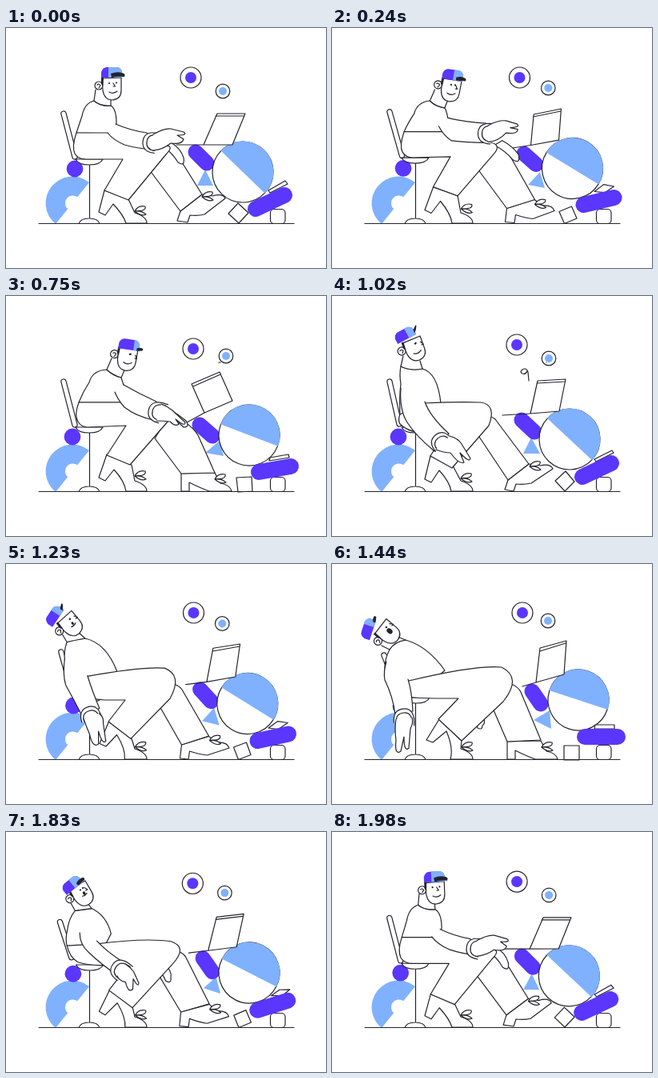
An HTML page that plays this animation: 400 px wide and 300 px high, repeating every 2.01 s.

```html
<!DOCTYPE html>
<html lang="en">
<head>
<meta charset="utf-8">
<title>Rocking at the desk</title>
<style>
html, body { margin: 0; width: 100%; height: 100%; overflow: hidden; background: #fff; }
svg { display: block; width: 100vw; height: 100vh; }
.line { fill: #fff; stroke: #24242f; stroke-width: 1.2; stroke-linejoin: round; stroke-linecap: round; }
.open { fill: none; }
.dark { fill: #24242f; }
.violet { fill: #5a36fe; }
.sky { fill: #80b1ff; }
.bar { fill: none; stroke: #5a36fe; stroke-linecap: round; }
</style>
</head>
<body>
<svg viewBox="0 0 400 300">
  <path class="sky" d="M104 193A33.400 33.400 0 0 0 62 245Z"/>
  <path fill="#fff" d="M89.500 211.500A9 9 0 1 0 77.500 226.500Z"/>
  <circle class="violet" id="dot" r="10.4"/>

  <path id="backEdge" fill="none" stroke="#24242f" stroke-width="7.4" stroke-linecap="round"/>
  <path id="backFill" fill="none" stroke="#fff" stroke-width="5" stroke-linecap="round"/>
  <path class="line" d="M104.500 168V238M91 244.500Q93 238 104 238Q115 238 117 244.500Z"/>
  <path class="line" id="seat" d="M87 164H121Q118 171 104 171Q90 171 87 164Z"/>

  <path class="sky" id="wedge"/>
  <path class="bar" id="pill" stroke-width="19"/>
  <g id="ball">
    <circle class="line" r="38"/>
    <path class="sky" d="M-38.500 0A38.500 38.500 0 0 1 38.500 0Z"/>
  </g>
  <path class="line" id="box"/>
  <rect class="line" x="330.500" y="226.500" width="18.500" height="18" rx="4.500"/>
  <path class="line" id="plate"/>
  <path class="bar" id="plank" stroke-width="20"/>

  <g id="coinA"><circle class="line" r="13"/><circle class="violet" r="7"/></g>
  <g id="coinB"><circle class="line" r="8.800"/><circle class="sky" r="5"/></g>
  <path class="line open" id="curl" pathLength="100" d="M268 83Q254 84 245 91Q243 99 238 97Q234 95 238 92Q243 89 245 95L246 106"/>
  <path class="line" id="laptop"/>

  <path class="line" id="bootB"/>
  <path class="line" id="legB"/>
  <path class="line laces" id="laceB"/>
  <path class="line" id="farHand"/>
  <path class="line" id="torso"/>
  <path class="line" id="neck"/>
  <g id="face">
    <circle class="line" cx="-14" cy="-2" r="5"/>
    <path class="line open" d="M-16 -3Q-14 -5 -12 -2L-14 1"/>
    <path class="line" d="M-10 -11L-9 4Q-7 16 3 16Q14 15 14 4V-12Z"/>
    <path class="dark" d="M-11 -12H-8L-8.500 -1L-11 -4Z"/>
    <circle class="dark" id="eyeL" cy="-5" r="1.100"/>
    <circle class="dark" id="eyeR" cy="-5.500" r="1.100"/>
    <path class="line" id="nose" d="M4 -5L6.500 -1H4"/>
    <path class="line open" id="smile"/>
    <ellipse class="dark" id="gasp" cx="5" cy="1"/>
  </g>
  <g id="cap">
    <path class="violet" d="M-12 6V-1Q-10 -7 -5 -7H8Q13 -6 14 -1V6Z"/>
    <path class="sky" id="capFront"/>
    <path class="dark" id="brim"/>
  </g>
  <path class="line" id="bootA"/>
  <path class="line" id="legA"/>
  <path class="line laces" id="laceA"/>
  <path class="line" id="arm"/>
  <g id="cuff">
    <path class="line" d="M10 -12Q-12 -15 -12 0Q-12 13 4 13"/>
    <path class="line open" d="M8 -10Q-7 -11 -7 0Q-7 10 4 10"/>
  </g>
  <path class="line" id="hand"/>
  <path class="line open" d="M41 244.500H360"/>
</svg>
<script>
const LOOP = 2010, STEP = 30;
const KEYS = [0, 480, 750, 1020, 1440, 1680, LOOP];
const COUNT = KEYS.length - 1;
const NUMBER = /-?\d+(\.\d+)?/g;
const $ = id => document.getElementById(id);
const tracks = [];

// Speed at each key: the harmonic mean of its neighbours, zero at a turning point.
function speeds(poses) {
  const slope = (k, n) => (poses[k + 1][n] - poses[k][n]) / (KEYS[k + 1] - KEYS[k]);
  return poses.map((pose, k) => pose.map((_, n) => {
    const a = slope((k + COUNT - 1) % COUNT, n), b = slope(k % COUNT, n);
    return a * b > 0 ? 2 * a * b / (a + b) : 0;
  }));
}

// One pose per key; the first pose returns at the end of the loop.
function track(id, attr, ...poses) {
  poses.push(poses[0]);
  const nums = poses.map(p => String(p).match(NUMBER).map(Number));
  tracks.push({ el: $(id), attr, text: String(poses[0]), nums, speed: speeds(nums) });
}
const shape = (id, ...poses) => track(id, "d", ...poses);
const place = (id, ...poses) => track(id, "transform",
  ...poses.map(([x, y, turn = 0]) => `translate(${x} ${y}) rotate(${turn})`));

place("dot", [86, 176], [91, 175], [83, 176], [83, 176], [86, 178], [83, 178]);
const back = ["M72 107L86 161", "M72 104L88 158", "M72 107L86 161", "M72 107L84 160", "M65 114L80 152", "M64 116L79 153"];
shape("backEdge", ...back);
shape("backFill", ...back);
place("seat", [0, 0], [0, -3], [0, 0], [0, 0], [1, 3], [1, 3]);

// Balancing pile
shape("wedge", "M249 177L239 197L259 197Z", "M271 183L251 195L273 203Z", "M267 181L249 196L272 200Z",
  "M249 177L239 197L260 197Z", "M272 183L252 195L274 206Z", "M273 184L253 194L275 206Z");
shape("pill", "M237 155L251 169", "M243 160L259 173", "M242 161L258 175", "M237 155L253 170", "M250 159L261 175", "M253 160L263 179");
place("ball", [296, 180, 44], [305, 171, 19], [304, 174, 21], [297, 179, 43], [308, 170, 18], [310, 172, 14]);
shape("box", "M278 232L290 219L303 231L291 244Z", "M290 227L309 227L309 245L290 245Z", "M288 227L307 226L308 244L290 245Z",
  "M279 231L292 219L303 232L291 244Z", "M290 227L309 227L309 245L290 245Z", "M290 227L308 226L309 244L291 245Z");
shape("plate", "M328 203L349 191L352 195L330 206Z", "M328 206L330 201L353 201L353 205Z", "M329 206L330 202L353 198L354 202Z",
  "M328 204L350 193L352 196L330 207Z", "M328 206L329 201L353 201L353 206Z", "M334 206L334 202L357 199L358 203Z");
shape("plank", "M312 226L348 209", "M317 216L357 215", "M316 220L356 213", "M313 226L349 209", "M316 216L357 216", "M316 219L356 213");

place("coinA", [231, 62], [238, 62], [234, 66], [231, 61], [238, 61], [236, 66]);
place("coinB", [271, 79], [270, 71], [275, 75], [271, 78], [270, 71], [275, 73]);
shape("laptop",
  "M213 146L247 146L264 107L299 107L283 146L247 146M262 110L297 110",
  "M228 158L250 147L237 109L271 95L284 133L250 147M238 112L272 98",
  "M217 163L248 146L232 110L267 95L283 131L248 146M234 113L268 98",
  "M213 149L248 147L257 106L292 104L284 144L248 147M256 109L292 107",
  "M238 153L255 148L260 105L293 96L290 138L255 148M260 109L292 99",
  "M240 155L257 150L262 106L295 98L292 141L257 150M262 109L294 101");

// Legs
const flatBoot = "M219 222L219 244L229 244L229 233Q243 240 254 244L282 244Q280 236 268 234L261 221Z";
shape("bootB",
  "M218 229L214 241L227 243L230 234Q240 235 248 233L274 213Q271 206 258 210L245 208Z",
  flatBoot, flatBoot,
  "M220 230L216 242L227 244L230 235Q240 236 249 234L276 216Q273 209 260 212L246 210Z",
  flatBoot, flatBoot);
shape("legB",
  "M170 165L218 229L245 208L210 152Q206 146 190 147Z",
  "M188 179L219 222L262 221L234 163Q225 150 205 146Z",
  "M186 178L219 222L261 221L240 174Q230 158 205 148Z",
  "M178 167L220 230L246 210L204 154Q198 148 180 150Z",
  "M200 178L219 222L261 220L236 160Q230 148 205 146Z",
  "M200 178L219 222L261 220L236 160Q230 148 205 146Z");
const toe = "L176 244Q176 236 161 231";
shape("bootA",
  `M123 203L116 230L124 234L134 220Q147 234 150 244${toe}L153 214Z`,
  `M130 195L116 225L124 229L137 213Q150 230 150 244${toe}L161 207Z`,
  `M126 198L116 227L124 231L135 217Q148 231 150 244${toe}L157 211Z`,
  `M123 200L116 229L124 233L134 218Q147 232 149 244${toe}L152 214Z`,
  `M134 194L118 220L126 223L143 209Q152 230 148 244${toe}L162 221Z`,
  `M134 194L117 220L124 224L143 209Q152 230 148 244${toe}L162 221Z`);
shape("legA",
  "M88 131Q82 148 86 157Q90 164 100 164L146 164L123 203L153 215L200 158Q212 146 196 147Q170 140 137 131Z",
  "M91 129Q85 147 90 154Q94 161 102 161L150 159L130 194L161 207L206 156Q212 144 198 139Q170 137 148 129Z",
  "M91 133Q85 149 90 157Q94 164 102 164L150 162L126 199L155 211L203 156Q210 148 196 148Q170 146 147 133Z",
  "M85 148Q82 155 85 160Q92 168 112 172L140 172L123 200L150 215L196 162Q206 136 186 133Q160 132 114 134Z",
  "M70 148Q78 160 92 166Q110 168 130 168L158 168L133 194L162 221L214 172Q238 142 212 129Q180 126 96 146Z",
  "M68 150Q78 162 92 166Q110 168 130 168L158 168L133 194L162 222L214 171Q240 142 214 129Q180 126 97 146Z");
for (const bow of document.querySelectorAll(".laces"))
  bow.setAttribute("d", "M0 0Q4 -8 13 -6Q15 0 0 0Q9 -1 14 4Q8 7 0 0Z");
place("laceA", [161, 229], [162, 223, 5], [161, 225], [161, 228], [162, 229], [162, 229]);
place("laceB", [245, 211], [262, 230], [261, 229], [247, 213], [262, 229], [262, 230]);

// Upper body
shape("farHand",
  "M196 148Q208 156 215 168Q224 174 222 162Q218 150 206 143Z",
  "M206 146Q220 152 232 164Q242 168 238 156Q228 146 216 140Z",
  "M204 148Q214 156 222 164Q230 164 225 156Q216 148 206 143Z",
  "M150 150Q158 152 165 156Q170 158 168 152Q160 146 152 144Z",
  "M172 180Q180 195 182 205Q188 208 188 202Q194 198 186 184Z",
  "M176 178Q186 192 188 201Q194 204 194 198Q200 194 190 180Z");
shape("torso",
  "M110 91Q98 94 95 110Q91 122 88 131L137 132L138 119Q138 101 131 97Q118 98 110 91Z",
  "M128 91Q110 92 106 106Q96 118 91 129L148 130L150 118Q146 106 145 102Q134 98 128 91Z",
  "M126 92Q108 93 104 108Q96 120 91 133L147 133L150 121Q146 108 144 102Q133 99 126 92Z",
  "M86 88Q84 98 86 110Q84 125 85 150L140 160L136 134Q132 96 113 91Q98 94 86 88Z",
  "M72 107Q66 118 66 130Q66 140 70 148L110 160L141 133Q120 103 92 95Q78 97 72 107Z",
  "M72 105Q66 118 65 132Q62 142 68 150L110 160L128 133Q118 107 92 95Q78 97 72 105Z");
shape("neck",
  "M112 77L110 91Q118 98 131 97L131 89",
  "M136 77L128 91Q134 98 145 102L150 93",
  "M132 78L126 92Q133 99 144 102L148 93",
  "M89 75L86 88Q98 94 113 91L110 81",
  "M62 102L72 107Q78 97 92 95L82 91",
  "M62 99L72 105Q78 97 92 95L82 87");
place("face", [130, 74, 0], [153, 77, 15], [149, 77, 10], [101, 66, -20], [68, 87, -50], [69, 83, -50]);
track("eyeL", "cx", -1, 5, 5, 5, 6, 6);
track("eyeR", "cx", 8, 6, 6, 6, 6, 6);
place("nose", [0, 0], [8, 0], [8, 0], [8, 0], [8, 0], [8, 0]);
const smile = "M-1 6Q4 9 9 5", shut = "M3 1Q5 1 7 1";
shape("smile", smile, smile, smile, smile, shut, shut);
track("gasp", "rx", 0, 0, 0, 0, 3, 3);
track("gasp", "ry", 0, 0, 0, 0, 4, 4);
place("cap", [131, 56, 0], [158, 62, 12], [153, 61, 8], [90, 49, -28], [45, 82, -72], [48, 77, -68]);
const front = x => `M${x} 6L${x} -7L8 -7Q13 -6 14 -1L14 6Z`;
shape("capFront", ...[-3, 7, 7, 4, 5, 5].map(front));
const side = "M11 3Q14 1 18 2Q20 3 18 5Q14 6 11 6Z";
shape("brim", "M0 1Q8 -2 14 0Q19 1 17 5Q8 4 1 6Z", side, side, "M13 0Q14 -1 18 -4Q20 -5 19 -3Q17 1 13 4Z", side, side);
shape("arm",
  "M137 120Q155 128 176 131L186 152Q165 151 148 146Q134 140 127 131",
  "M148 109Q170 113 200 114L194 140Q170 140 150 138Q142 130 136 115",
  "M147 111Q166 122 188 132L184 155Q162 150 148 139Q140 130 136 120",
  "M116 132Q122 150 146 172L128 194Q105 175 94 158Q84 142 86 115",
  "M95 144Q100 160 101 184L79 188Q76 165 66 145Q64 135 68 122",
  "M97 146Q104 162 118 182L98 198Q82 175 68 152Q62 140 68 122");
place("cuff", [183, 143, 8], [199, 127, 2], [190, 145, 14], [137, 183, 50], [90, 193, 85], [108, 192, 62]);
shape("hand",
  "M184 133Q198 125 206 126L222 130Q228 134 214 134L222 139Q220 146 206 144Q196 152 184 153",
  "M200 117Q212 111 222 112L234 116Q240 120 226 121L236 122Q236 128 222 126Q212 138 199 138",
  "M194 135Q202 138 208 143L224 158Q224 164 212 154L216 160Q212 164 205 157Q196 156 188 156",
  "M147 175Q158 178 162 185L173 203Q172 209 160 196L165 208Q159 211 148 196Q140 196 130 192",
  "M100 192Q102 198 98 206L96 230Q90 236 90 216L86 234Q78 240 80 220Q78 206 80 194",
  "M118 188Q119 200 118 208L116 230Q110 238 110 218L104 236Q96 240 100 218Q94 208 99 197");

function drawCurl(t) {
  const head = Math.min(100, 3 + Math.max(0, t - 750) * .36);
  const tail = Math.max(0, Math.min(100, (t - 840) * .25));
  $("curl").style.display = t >= 720 && t < 1170 ? "" : "none";
  $("curl").setAttribute("stroke-dasharray", `0 ${tail} ${Math.max(0, head - tail)} 200`);
}

function draw(now) {
  const t = Math.floor(now % LOOP / STEP) * STEP;
  const i = KEYS.findIndex(k => k > t) - 1;
  const span = KEYS[i + 1] - KEYS[i];
  const u = (t - KEYS[i]) / span, v = 1 - u;
  const ease = u * u * (3 - 2 * u);
  for (const { el, attr, text, nums, speed } of tracks) {
    let n = 0;
    el.setAttribute(attr, text.replace(NUMBER, () => {
      const a = nums[i][n], b = nums[i + 1][n];
      const bend = span * u * v * (v * speed[i][n] - u * speed[i + 1][n]);
      n++;
      return (a + (b - a) * ease + bend).toFixed(2);
    }));
  }
  drawCurl(t);
}

const start = performance.now();
function tick() {
  draw(performance.now() - start);
  requestAnimationFrame(tick);
}
tick();
</script>
</body>
</html>
```
